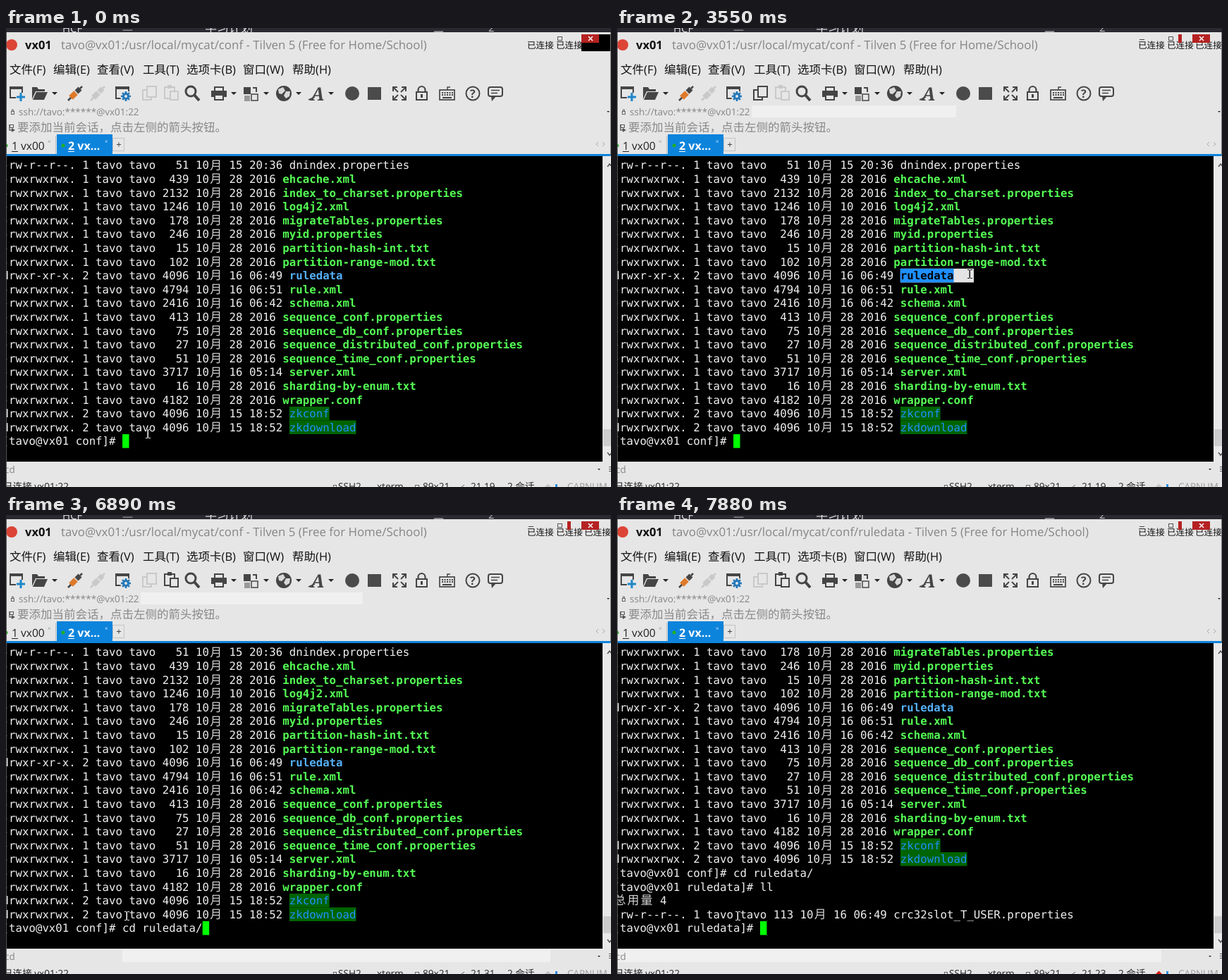
An HTML page with a canvas that plays this animation: 858 by 652 pixels, repeating every 8 s.

```html
<!DOCTYPE html>
<html lang="zh">
<head>
<meta charset="utf-8">
<title>Terminal</title>
<style>
html, body { margin: 0; width: 100%; height: 100%; overflow: hidden; background: #e6e6e6; }
canvas { display: block; width: 858px; height: 652px; }
</style>
</head>
<body>
<canvas id="stage" width="858" height="652"></canvas>
<script>
const g = document.getElementById('stage').getContext('2d');
g.textRendering = 'geometricPrecision';
const LOOP = 8000;
const UI = '"Open Sans", "Noto Sans CJK SC", "Noto Sans CJK", sans-serif';
const MONO = '"DejaVu Sans Mono", "Noto Sans CJK SC", "Noto Sans CJK", monospace';
const CW = 9.47, LH = 19.6, LEFT = -5.4, TOP = 185;
const BG = '#e6e6e6', LIGHT = '#f0f0f0', INK = '#454545', DIM = '#c9c9c9', BLUE = '#0d84dc';
const WHITE = '#f0f0f0', GREEN = '#55ff55', SKY = '#55b0f8';
const USER = 'tavo', HOST = 'vx01';

// size | date | name
const files = `51|15 20:36|dnindex.properties
439|28 2016|ehcache.xml
2132|28 2016|index_to_charset.properties
1246|10 2016|log4j2.xml
178|28 2016|migrateTables.properties
246|28 2016|myid.properties
15|28 2016|partition-hash-int.txt
102|28 2016|partition-range-mod.txt
4096|16 06:49|ruledata
4794|16 06:51|rule.xml
2416|16 06:42|schema.xml
413|28 2016|sequence_conf.properties
75|28 2016|sequence_db_conf.properties
27|28 2016|sequence_distributed_conf.properties
51|28 2016|sequence_time_conf.properties
3717|16 05:14|server.xml
16|28 2016|sharding-by-enum.txt
4182|28 2016|wrapper.conf
4096|15 18:52|zkconf
4096|15 18:52|zkdownload`.split('\n').map(s => s.split('|'));

// [time, value] lists; the latest entry at or before t holds
const at = (t, list) => list.reduce((v, [time, x]) => t >= time ? x : v, list[0][1]);

const typed = [[0, ''], [440, 'c'], [720, 'cd'], [1310, 'c'], [1430, ''], [4610, 'c'], [4760, 'cd'],
  [5030, 'cd '], [5270, 'cd r'], [5510, 'cd ru'], [5790, 'cd rul'], [5910, 'cd rule'],
  [6340, 'cd ruled'], [6610, 'cd ruledata/'], [7040, ''], [7440, 'l'], [7570, 'll'], [7880, '']];
const sending = [[0, 0], [440, 1], [870, 0], [1310, 1], [1430, 0], [4610, 1], [5150, 0], [5270, 1],
  [5390, 0], [5510, 1], [5910, 0], [6340, 1], [6890, 0], [7040, 1], [7170, 0], [7440, 1]];
const pointer = [[0, [201, 576]], [2480, [339, 474]], [2600, [370, 420]], [2720, [386, 383]],
  [2880, [387, 364]], [3030, [388, 356]], [3160, [390, 350]], [3310, [477, 350]], [3430, [492, 350]],
  [3550, [500, 349]], [3970, [400, 430]], [4090, [240, 536]], [4210, [165, 569]], [4460, [171, 569]]];
const picked = [[0, 0], [3310, 8], [3430, 11], [3970, 0]];
const upperBand = [[0, 0], [3310, 481], [3700, 506], [7040, 0]];
const lowerBand = [[0, 772], [440, 165], [1310, 772], [4610, 165], [7040, 772], [7440, 203], [7880, 1]];

function box(x, y, w, h, color) {
  g.fillStyle = color;
  g.fillRect(x, y, w, h);
}
function text(s, x, y, size, color, weight = '', family = UI) {
  g.font = `${weight} ${size}px ${family}`;
  g.fillStyle = color;
  g.fillText(s, x, y);
}
function line(points, color = INK, width = 2) {
  g.strokeStyle = color;
  g.lineWidth = width;
  g.beginPath();
  for (let i = 0; i < points.length; i += 2) g.lineTo(points[i], points[i + 1]);
  g.stroke();
}
function poly(points, color) {
  g.fillStyle = color;
  g.beginPath();
  for (let i = 0; i < points.length; i += 2) g.lineTo(points[i], points[i + 1]);
  g.fill();
}
function frame(x, y, w, h, color = INK, width = 2) {
  g.strokeStyle = color;
  g.lineWidth = width;
  g.strokeRect(x, y, w, h);
}
function disc(x, y, r, color) {
  g.fillStyle = color;
  g.beginPath();
  g.arc(x, y, r, 0, 7);
  g.fill();
}
function ring(x, y, r, color = INK, width = 2) {
  g.strokeStyle = color;
  g.lineWidth = width;
  g.beginPath();
  g.arc(x, y, r, 0, 7);
  g.stroke();
}
const caret = (x, y, r = 4) => poly([x - r, y - r / 2, x + r, y - r / 2, x, y + r / 2], '#222');

function titleBar(t) {
  box(0, 0, 858, 6, '#2a2931');
  g.save();
  g.beginPath();
  g.rect(0, 0, 858, 6);
  g.clip();
  text('HCF', 80, 6, 15, '#ddd');
  text('一', 165, 9, 15, '#999');
  text('学习计划', 282, 6, 17, '#ddd');
  text('二', 606, 6, 15, '#bbb');
  text('2', 684, 5, 15, '#bbb');
  g.restore();
  disc(8, 24, 8, '#dc4436');
  text(HOST, 27, 30, 16.5, '#111', 'bold');
  const path = '/usr/local/mycat/conf' + (t >= 7040 ? '/ruledata' : '');
  text(`${USER}@${HOST}:${path} - Tilven 5 (Free for Home/School)`, 78, 30, 16.87, '#858585');

  const late = t >= 1310;
  for (const x of late ? [739, 780, 820] : [739, 780]) text('已连接', x, 29, 12.6, '#111');
  frame(782.5, 12.5, 6, 5, '#555', 1);
  if (late) {
    box(741, 16, 7, 1, '#444');
    box(796, 9, 5, 12, '#b52222');
  } else {
    box(816, 9, 41, 24, '#000');
  }
  box(816, 9, 25, 12, '#b52222');
  line([826, 12, 832, 18], '#fff', 1.5);
  line([832, 12, 826, 18], '#fff', 1.5);
}

function menu() {
  const items = [['文件(F)', 5], ['编辑(E)', 67], ['查看(V)', 129], ['工具(T)', 194],
    ['选项卡(B)', 256], ['窗口(W)', 336], ['帮助(H)', 406]];
  for (const [s, x] of items) text(s, x, 65, 16.5, '#111');
}

function gear(x, y) {
  for (let i = 0; i < 8; i++) {
    const a = i * Math.PI / 4, c = Math.cos(a), s = Math.sin(a);
    line([x + 3 * c, y + 3 * s, x + 7 * c, y + 7 * s], '#2478b8', 2.6);
  }
  disc(x, y, 5, '#2478b8');
  disc(x, y, 2, BG);
}
function plug(x, y, dark, accent) {
  line([x - 10, y + 10, x - 5, y + 5], dark, 2.5);
  line([x - 6, y + 6, x + 1, y - 1], accent, 8);
  line([x + 2, y - 2, x + 7, y - 7], dark, 7);
  line([x + 7, y - 7, x + 10, y - 10], dark, 2.5);
}
function pages(x, color) {
  frame(x, 88, 12, 14, color);
  box(x + 6, 82, 14, 17, BG);
  frame(x + 6, 83, 13, 15, color);
}
function clipboard(x, color) {
  frame(x, 84, 14, 16, color);
  box(x + 4, 81, 6, 5, color);
  box(x + 7, 89, 13, 14, BG);
  frame(x + 8, 90, 11, 12, color);
}

function toolbar(t) {
  frame(6, 84, 17, 15);
  box(5, 83, 19, 4, INK);
  box(14, 92, 14, 12, BG);
  line([21, 92, 21, 104], '#1f86c8', 3);
  line([15, 98, 27, 98], '#1f86c8', 3);
  poly([37, 101, 37, 84, 44, 84, 46, 87, 55, 87, 55, 90, 42, 90], INK);
  poly([38, 102, 43, 91, 59, 91, 54, 102], INK);
  caret(69, 93);
  plug(98, 93, INK, '#df7a2a');
  plug(130, 93, DIM, DIM);
  frame(156, 84, 18, 16);
  box(155, 83, 20, 4, INK);
  disc(170, 97, 8, BG);
  gear(170, 97);
  pages(194, t >= 3310 && t < 3970 ? INK : DIM);
  clipboard(225, t >= 3700 ? INK : DIM);
  ring(262, 90, 7, INK, 3);
  line([267, 95, 274, 103], INK, 4);

  frame(296, 84, 12, 7);
  box(291, 89, 22, 9, INK);
  box(296, 94, 12, 9, BG);
  frame(296, 95, 12, 7);
  caret(323, 93);
  box(337, 84, 10, 10, INK);
  frame(348, 94, 9, 9, INK, 1.5);
  box(338, 96, 8, 8, '#999');
  line([350, 85, 355, 85, 355, 91], INK, 2);
  caret(369, 93);
  disc(394, 93, 11, INK);
  poly([386, 87, 393, 84, 396, 89, 391, 94, 387, 93], '#d8d8d8');
  poly([397, 90, 403, 90, 402, 97, 397, 100, 394, 96], '#d8d8d8');
  caret(415, 93);
  text('A', 432, 103, 26, INK, 'italic bold', '"Noto Serif", serif');
  line([429, 102, 438, 98], INK, 1.5);
  caret(461, 93);
  disc(491, 93, 10, '#4b4b4b');
  box(513, 84, 19, 18, '#4b4b4b');

  for (const [sx, sy] of [[-1, -1], [1, -1], [-1, 1], [1, 1]]) {
    const x = 558 + 9 * sx, y = 93 + 9 * sy;
    line([x - 6 * sx, y, x, y, x, y - 6 * sy], INK, 2);
    line([x, y, x - 7 * sx, y - 7 * sy], INK, 2);
  }
  g.strokeStyle = INK;
  g.lineWidth = 2.2;
  g.beginPath();
  g.moveTo(584.5, 91);
  g.arc(589.5, 88, 5, Math.PI, 0);
  g.lineTo(594.5, 91);
  g.stroke();
  frame(582, 91, 15, 11);
  box(588, 94, 3, 5, INK);
  frame(615, 88, 21, 14, INK, 1.7);
  line([626, 88, 626, 84, 630, 84], INK, 1.5);
  for (let i = 0; i < 10; i++) box(618 + i % 5 * 3.5, 91 + (i / 5 | 0) * 3, 2, 2, INK);
  box(619, 98, 13, 2, INK);
  ring(662, 93, 9.5);
  text('?', 658, 99, 16, INK, 'bold');
  g.strokeStyle = INK;
  g.lineWidth = 2;
  g.beginPath();
  g.roundRect(684, 84, 20, 13, 3);
  g.stroke();
  poly([688, 97, 695, 97, 689, 104], INK);
  line([688, 88.5, 700, 88.5], INK, 1.5);
  line([688, 92.5, 697, 92.5], INK, 1.5);
}

function addressAndTabs(t) {
  const end = at(t, upperBand);
  if (end) box(191, 110, end - 191, 17, LIGHT);
  frame(7.5, 118.5, 4, 4, '#666', 1);
  line([8.5, 118, 8.5, 116, 10.5, 116, 10.5, 118], '#666', 1);
  text(`ssh://${USER}:******@${HOST}:22`, 18, 123.5, 13.5, '#858585');
  caret(854, 119, 2);
  line([5, 137, 5, 145, 8, 145], '#555', 1.3);
  frame(5.5, 137.5, 5, 4, '#555', 1);
  poly([8, 142, 13, 145, 8, 148], '#555');
  text('要添加当前会话，点击左侧的箭头按钮。', 16, 147, 16.5, '#888');

  disc(0, 167, 2.5, '#22b022');
  text('1 vx00', 8, 173, 15.6, '#222');
  box(8, 175, 9, 1, '#222');
  text('×', 59, 164, 8, '#999');
  box(70, 153, 1, 27, '#bbb');
  box(72, 151, 79, 30, BLUE);
  disc(81, 167, 2.5, '#22b022');
  text('2 vx...', 88, 173, 16, '#fff', 'bold');
  box(88, 175, 9, 1, '#fff');
  text('×', 140, 164, 8, '#d8ecfa');
  frame(151.5, 156.5, 16, 18, '#c4c4c4', 1);
  line([157, 165.5, 163, 165.5], '#444', 1);
  line([160, 162.5, 160, 168.5], '#444', 1);
  line([840, 162, 837, 165, 840, 168], '#aaa', 1);
  line([846, 162, 849, 165, 846, 168], '#aaa', 1);
  box(0, 179, 858, 3, BLUE);
}

// Text on the character grid
function cells(s, col, row, color = WHITE, weight = '') {
  text(s, LEFT + col * CW, TOP + row * LH + 15.3, CW / 0.602, color, weight, MONO);
}
function wide(s, col, row) {
  [...s].forEach((c, i) =>
    text(c, LEFT + (col + i * 2) * CW + 1, TOP + row * LH + 15.5, 17, '#d2d2d2', '300',
      '"Noto Sans CJK SC", "Noto Sans CJK", sans-serif'));
}
function fill(col, row, n, color) {
  box(LEFT + col * CW, TOP + row * LH, n * CW, LH, color);
}

function fileRow([size, date, name], row, sel) {
  const dir = !name.includes('.'), zk = name.startsWith('zk'), plain = name.startsWith('dn');
  const mode = plain ? '-rw-r--r--.' : name === 'ruledata' ? 'drwxr-xr-x.'
    : (dir ? 'd' : '-') + 'rwxrwxrwx.';
  cells(`${mode} ${dir ? 2 : 1} ${USER} ${USER} ${size.padStart(4)} 10`, 0, row);
  wide('月', 31, row);
  cells(date, 34, row);
  const col = date.includes(':') ? 43 : 42;
  if (zk) {
    fill(col, row, name.length, '#006400');
    cells(name, col, row, '#1e90ff');
  } else if (name === 'ruledata') {
    if (sel) fill(col, row, sel, '#e4e4e4');
    if (sel) fill(col, row, 8, '#1e90ff');
    cells(name, col, row, sel ? '#000' : SKY, 'bold');
  } else {
    cells(name, col, row, plain ? WHITE : GREEN, plain ? '' : 'bold');
  }
}

const prompt = dir => `[${USER}@${HOST} ${dir}]# `;

function terminal(t) {
  box(1, 182, 845, 434, '#000');
  const scroll = at(t, [[0, 0], [7040, 1], [7720, 4]]);
  files.forEach((f, i) => {
    if (i >= scroll) fileRow(f, i - scroll, at(t, picked));
  });
  if (scroll) cells(prompt('conf') + 'cd ruledata/', 0, 20 - scroll);
  if (scroll === 4) {
    cells(prompt('ruledata') + 'll', 0, 17);
    wide('总用量', 0, 18);
    cells('4', 7, 18);
    cells(`-rw-r--r--. 1 ${USER} ${USER} 113 10`, 0, 19);
    wide('月', 30, 19);
    cells('16 06:49 crc32slot_T_USER.properties', 33, 19);
  }
  const last = prompt(scroll ? 'ruledata' : 'conf') + at(t, typed);
  cells(last, 0, 20);
  fill(last.length, 20, 1, '#00ff00');
  return last.length + 1;
}

function scrollBar() {
  box(846, 182, 12, 434, '#e9e9e9');
  box(847, 570, 11, 24, '#cdcdcd');
  line([853, 197, 856, 193, 859, 197], '#444', 1.3);
  line([853, 603, 856, 607, 859, 603], '#444', 1.3);
}

function bottom(t, column) {
  const from = at(t, lowerBand);
  box(from, 618, 772 - from, 17, LIGHT);
  text('cd', -2, 632, 13.5, '#858585');
  caret(841, 627, 2);
  for (const y of [623, 626, 629]) box(855, y, 3, 1, '#555');
  const copied = t >= 3700 && t < 5030;
  text(copied ? '已复制10字符' : `已连接 ${HOST}:22`, -4, 655.5, 13.6, '#222');
  frame(464.5, 649.5, 4, 4, '#666', 1);
  text('SSH2', 471, 655.5, 13.6, '#222');
  text('xterm', 526, 655.5, 13.6, '#222');
  frame(580.5, 649.5, 5, 4, '#666', 1);
  text('89x21', 591, 655.5, 13.6, '#222');
  line([646, 652, 650, 649], '#666', 1);
  text(`21,${column}`, 659, 655.5, 13.6, '#222');
  text('2 会话', 711, 655.5, 13.6, '#222');
  poly([764, 652, 768.5, 647.5, 773, 652], at(t, sending) ? '#e01818' : '#c4c4c4');
  box(779, 648, 3, 4, '#2a8fe0');
  text('CAP', 796, 655.5, 13.4, '#999');
  text('NUM', 821, 655.5, 13.4, '#999');
}

function beam([x, y]) {
  g.globalCompositeOperation = 'difference';
  box(x - 0.5, y - 5, 1.5, 11, '#fff');
  for (const dy of [-6, 6]) {
    box(x - 3, y + dy, 3, 1, '#fff');
    box(x + 1, y + dy, 3, 1, '#fff');
  }
  g.globalCompositeOperation = 'source-over';
}

function draw(t) {
  box(0, 0, 858, 652, BG);
  titleBar(t);
  menu();
  toolbar(t);
  addressAndTabs(t);
  const column = terminal(t);
  scrollBar();
  bottom(t, column);
  box(0, 6, 1, 646, '#555');
  box(857, 6, 1, 176, '#777');
  beam(at(t, pointer));
}

const start = performance.now();
function tick() {
  draw((performance.now() - start) % LOOP);
  requestAnimationFrame(tick);
}
tick();
</script>
</body>
</html>
```
